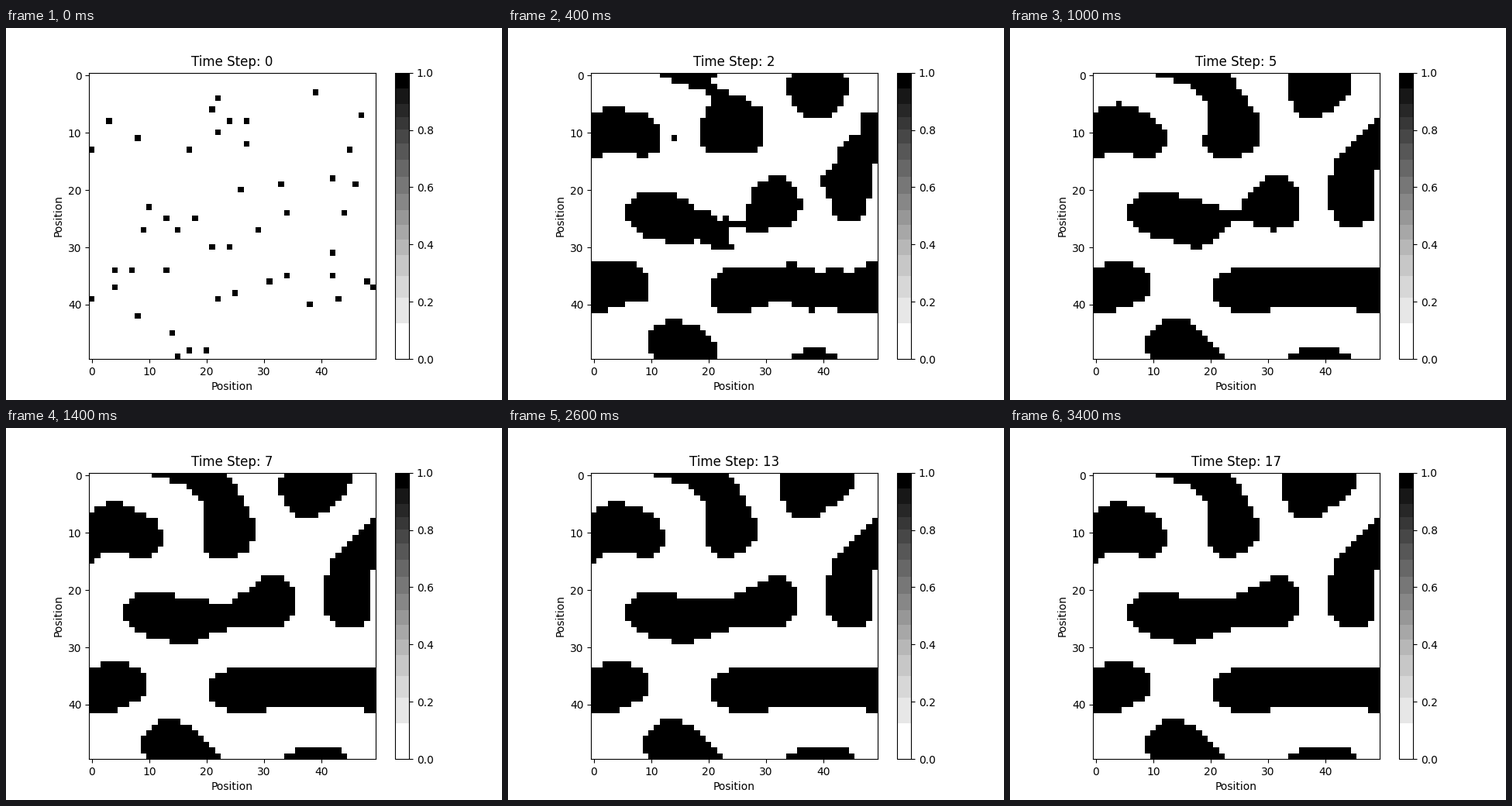
A matplotlib script that plays this animation: 640x480 px, repeating every 3.6 s.

```python
import numpy as np
import matplotlib.pyplot as plt
from matplotlib.animation import FuncAnimation
from matplotlib.colors import ListedColormap

SIZE = 50
STEPS = 18
INTERVAL = 200
R_ACT, R_INH = 5, 10          # outer radii of the two zones
INHIBITION, THRESHOLD = 0.33, 0.1

# Scattered live cells, numbered row by row
LIVE = [189, 222, 321, 397, 403, 424, 427, 522, 558, 627, 650, 667,
        695, 942, 983, 996, 1026, 1160, 1234, 1244, 1263, 1268, 1359,
        1365, 1379, 1521, 1524, 1592, 1704, 1707, 1713, 1784, 1792,
        1831, 1848, 1854, 1899, 1925, 1950, 1972, 1993, 2038, 2108,
        2264, 2417, 2420, 2465]


def count_near(grid, radius):
    """Live cells closer than radius to each cell, on a torus."""
    reach = range(-radius, radius + 1)
    return sum(np.roll(grid, (dy, dx), axis=(0, 1))
               for dy in reach for dx in reach
               if dx * dx + dy * dy < radius ** 2)


def step(grid):
    """Switch on the cells where activation outweighs inhibition."""
    near = count_near(grid, R_ACT)
    ring = count_near(grid, R_INH) - near
    return (near - INHIBITION * ring > THRESHOLD).astype(int)


def banded_greys():
    """Greys reduced to flat bands 16 levels wide, with pure ends."""
    level = plt.get_cmap("Greys")(np.linspace(0, 1, 256))[:, 0] * 255
    band = np.floor(level / 16) * 16 + 7
    band[level >= 240] = 255
    band[level < 16] = 0
    return ListedColormap(np.repeat(band[:, None] / 255, 3, axis=1))


start = np.zeros((SIZE, SIZE), dtype=int)
start.flat[LIVE] = 1
grids = [start]
while len(grids) < STEPS:
    grids.append(step(grids[-1]))

fig, ax = plt.subplots(figsize=(6.4, 4.8), dpi=100)
image = ax.imshow(start, cmap=banded_greys(), vmin=0, vmax=1,
                  interpolation="nearest")
fig.colorbar(image, ax=ax)
ax.set_xlabel("Position")
ax.set_ylabel("Position")
title = ax.set_title("Time Step: 0")


def update(i):
    image.set_data(grids[i])
    title.set_text(f"Time Step: {i}")
    return image, title


anim = FuncAnimation(fig, update, frames=STEPS, interval=INTERVAL,
                     repeat=True, repeat_delay=0)
plt.show()
```
